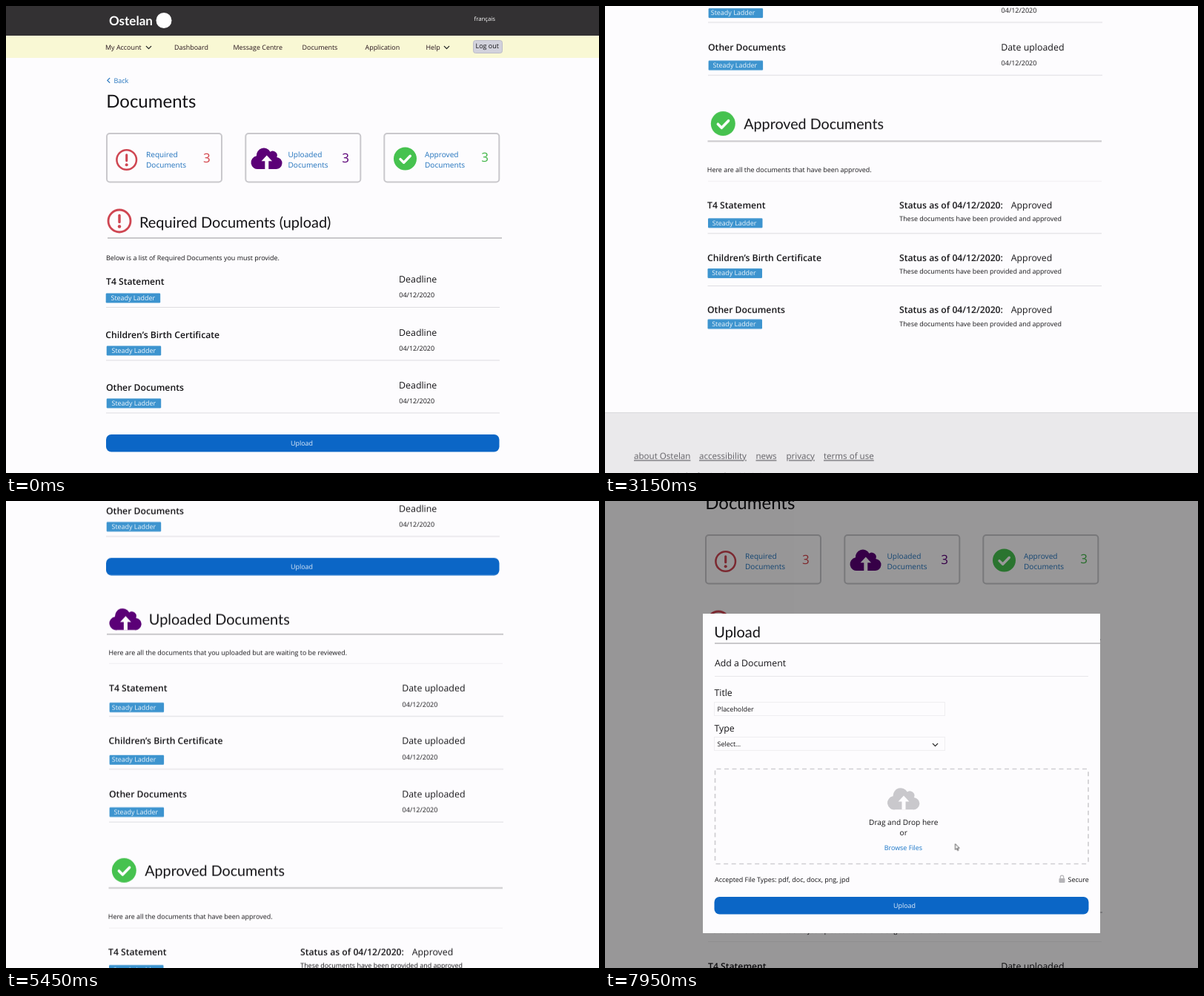
These frames come from a looping animation (800 by 630 pixels, 8 s). An HTML page:

```html
<!DOCTYPE html>
<html lang="en">
<head>
<meta charset="utf-8">
<title>Documents</title>
<style>
  html, body { margin: 0; width: 100%; height: 100%; overflow: hidden; background: #fdfcfe; }
  svg { display: block; width: 800px; height: 630px; }
  text { font-family: "Open Sans", "Noto Sans", sans-serif; fill: #141316; text-rendering: geometricPrecision; white-space: pre; }
  .head { font-family: Lato, sans-serif; }
  .link { text-decoration: underline; }
</style>
</head>
<body>
<svg id="stage" viewBox="0 0 800 630">
  <rect width="800" height="630" fill="#fdfcfe"/>
  <g id="page"></g>
  <path id="shade" d="M0 0H800V630H0ZM132 152V583H668V152Z" fill="#000" opacity="0"/>
  <g id="modal" opacity="0"></g>
  <path id="cursor" d="M0 0v8l1.9-1.8 1.3 2.9 1.2-.5-1.3-2.8h2.6z" fill="#fff" stroke="#333" stroke-width=".8" opacity="0"/>
</svg>
<script>
const LOOP = 8000;
const SMALL = 8.95, LABEL = 10.1, BODY = 12.3, HEAD = 19.95;
const BLUE = '#0b66c6', LINK = '#2273bd', RED = '#cf4652', PURPLE = '#5b0077', GREEN = '#46c24f';
const RULE = '#c9c8cb', THIN = '#dddce0', FAINT = '#efeef1';
const PLACE = 'Ostelan', PROGRAM = 'Steady Ladder';

const $ = id => document.getElementById(id);
let layer = $('page');

function add(tag, attrs, content) {
  const el = document.createElementNS('http://www.w3.org/2000/svg', tag);
  for (const k in attrs) el.setAttribute(k, attrs[k]);
  if (content) el.textContent = content;
  return layer.appendChild(el);
}
const text = (x, y, str, size = SMALL, more = {}) => add('text', { x, y, 'font-size': size, ...more }, str);
const bold = (x, y, str) => text(x, y, str, 12.2, { 'font-weight': 600 });
const head = (x, y, str, size = HEAD) => text(x, y, str, size, { class: 'head' });
const mid = (x, y, str, size = SMALL, fill = '#141316') =>
  text(x, y, str, size, { 'text-anchor': 'middle', style: `fill:${fill}` });
const tint = (x, y, str, fill, size = SMALL, weight = 400) =>
  text(x, y, str, size, { style: `fill:${fill}`, 'font-weight': weight });
const rect = (x, y, width, height, fill, more = {}) => add('rect', { x, y, width, height, fill, ...more });
const circle = (cx, cy, r, fill, more = {}) => add('circle', { cx, cy, r, fill, ...more });
const rule = (x, y, end, color = THIN, h = 1) => rect(x, y - h / 2, end - x, h, color);
const stroke = (d, color, w) =>
  add('path', { d, fill: 'none', stroke: color, 'stroke-width': w, 'stroke-linecap': 'round', 'stroke-linejoin': 'round' });
const chevron = (x, y, color = '#222') => stroke(`M${x - 3.2} ${y - 1.6}l3.2 3.2 3.2-3.2`, color, 1.3);

function cloud(x, y, s, color) {
  const transform = `translate(${x} ${y}) scale(${s})`;
  add('path', { transform, fill: color,
    d: 'M9 28.5A9 9 0 0 1 6 10.7A10 10 0 0 1 24.7 5A6 6 0 0 1 33.6 12.4A8 8 0 0 1 32 28.5Z' });
  add('path', { transform, fill: '#fdfcfe', d: 'M20 10l7.3 7.8h-4.8v10.7h-5v-10.7h-4.8z' });
}
function alertIcon(x, y, r) {
  circle(x, y, r, 'none', { stroke: RED, 'stroke-width': r * .19 });
  stroke(`M${x} ${y - r * .5}V${y + r * .1}`, RED, r * .23);
  circle(x, y + r * .5, r * .15, RED);
}
function tick(x, y, r) {
  circle(x, y, r, GREEN);
  stroke(`M${x - r * .42} ${y + r * .04}l${r * .3} ${r * .3} ${r * .56} ${-r * .58}`, '#fff', r * .22);
}
function badge(x, y, textX) {
  rect(x, y, 73.5, 13, '#3d94cf', { rx: 1.2 });
  tint(textX, y + 9.4, PROGRAM, '#f0f7fc');
}
function button(x, y, w, labelX) {
  rect(x, y, w, 23.5, BLUE, { rx: 7 });
  mid(labelX, y + 14.6, 'Upload', SMALL, '#e4eefa');
}
function card(x, textX, name, numX, numY, color) {
  rect(x, 172, 155, 65.5, 'none', { rx: 4, stroke: '#c9c8cc', 'stroke-width': 2 });
  tint(textX, 204.3, name, LINK, LABEL);
  tint(textX, 218, 'Documents', LINK, LABEL);
  tint(numX, numY, '3', color, 17, 500);
}
const TITLES = ['T4 Statement', 'Children’s Birth Certificate', 'Other Documents'];

function buildPage() {
  rect(0, 0, 800, 40, '#333133');
  text(139, 26.3, PLACE, 17, { class: 'head', 'font-weight': 700, style: 'fill:#fff' });
  circle(213, 19.5, 10.5, '#fff');
  tint(631.5, 20.2, 'français', '#fff', 7.8);
  rect(0, 40, 800, 30, '#f9f8d4');
  [[134, 'My Account'], [227, 'Dashboard'], [306.5, 'Message Centre'], [399.5, 'Documents'], [484.5, 'Application'], [566.5, 'Help']]
    .forEach(([x, s]) => tint(x, 58.6, s, '#26131b'));
  chevron(192.5, 56);
  chevron(594.5, 56);
  rect(630.5, 46.5, 39, 17, '#d2d2dc', { rx: 3, stroke: '#bcbcc8' });
  text(633.5, 57.4, 'Log out');

  stroke('M139.8 97.3l-3 3 3 3', LINK, 1.2);
  tint(145.5, 103.6, 'Back', LINK, 9);
  head(135.2, 137.3, 'Documents', 24);

  card(136, 189, 'Required', 266, 211, '#d3434a');
  card(323.3, 380.5, 'Uploaded', 453.3, 211, PURPLE);
  card(510.3, 565, 'Approved', 641.3, 210, '#43b649');
  alertIcon(162.7, 207.5, 13.3);
  cloud(332, 191.7, .99, PURPLE);
  tick(538.5, 206, 15.5);

  alertIcon(153, 290, 15);
  head(180, 298.8, 'Required Documents (upload)');
  rule(137, 313, 669, RULE, 2);
  text(135, 343, 'Below is a list of Required Documents you must provide.');
  [[375.5, 387.5, 406.5], [447.5, 458.5, 478], [518.7, 529.5, 549]].forEach(([y, by, line], i) => {
    bold(i === 1 ? 134.2 : 135, y, TITLES[i]);
    badge(i ? 135.7 : 134.7, by, i ? 142.5 : 141.5);
    text(530, y - 2.8, 'Deadline', 12.4);
    text(530.3, y + 17.5, '04/12/2020', 9);
    rule(135, line, 666);
  });
  button(135, 578, 530.5, 399);

  cloud(141, 646.3, 1.02, PURPLE);
  head(192.8, 668, 'Uploaded Documents');
  rule(136, 681, 671, RULE, 2);
  text(138.4, 709.3, 'Here are all the documents that you uploaded but are waiting to be reviewed.');
  rule(139, 720.5, 670, FAINT);
  [[758.2, 773.3, 791.7], [829.3, 844, 863], [900.5, 914.5, 934.3]].forEach(([y, by, line], i) => {
    bold(i === 1 ? 138.6 : 139, y, TITLES[i]);
    badge(139.6, by, i === 2 ? 145.5 : 142.8);
    text(534.2, y, 'Date uploaded', 12.4);
    text(534.6, y + 20.4, '04/12/2020', 9);
    rule(139, line, 671);
  });

  tick(159.3, 999.6, 16.5);
  head(187.3, 1007, 'Approved Documents', 19.7);
  rule(138.5, 1023.3, 670, RULE, 2);
  text(137.8, 1065, 'Here are all the documents that have been approved.');
  rule(139, 1077.3, 670, FAINT);
  [[1114, 1127.2, 1147.7], [1184.7, 1195, 1218.5], [1255.3, 1263.5]].forEach(([y, by, line], i) => {
    bold(138, y, TITLES[i]);
    badge(i ? 138.5 : 139, by, i ? 144.2 : 144.8);
    bold(397, y, 'Status as of 04/12/2020:');
    text(547.8, y, 'Approved', BODY);
    text(397.2, y + 17.3, 'These documents have been provided and approved');
    if (line) rule(138.5, line, 670);
  });

  rect(0, 1389, 800, 260, '#eae9eb');
  rule(0, 1389.5, 800, '#d9d8db');
  const link = (x, y, s, size) => text(x, y, s, size, { class: 'link', style: 'fill:#626166' });
  [[39, 'about ' + PLACE], [127, 'accessibility'], [203.5, 'news'], [244.5, 'privacy'], [295, 'terms of use']]
    .forEach(([x, s]) => link(x, 1452.4, s, 11.6));
  link(39, 1477.7, `© Regent’s Binder for ${PLACE}, 2012–21`, 9.85);
}

function buildModal() {
  layer = $('modal');
  rect(132, 152, 536, 431, '#fdfcfe');
  head(147.3, 184.3, 'Upload');
  rule(148, 192, 668, RULE, 2);
  text(148, 223.4, 'Add a Document', BODY);
  rule(148, 236.5, 652, '#e8e7ea');
  text(147.5, 263, 'Title', BODY);
  text(147.5, 310.6, 'Type', BODY);
  [271.5, 318.5].forEach(y => rect(147.5, y, 311, 18, 'none', { stroke: '#efeef1' }));
  text(151.5, 283.7, 'Placeholder');
  text(151.5, 331.2, 'Select...');
  chevron(445.5, 329);
  rect(148.5, 361.5, 503.5, 128, 'none', { rx: 2, stroke: '#cfced2', 'stroke-width': 1.7, 'stroke-dasharray': '6 4.5' });
  cloud(382.6, 387.3, 1.02, '#c9c8cc');
  mid(402.7, 437, 'Drag and Drop here', LABEL);
  mid(402.7, 450.8, 'or', LABEL);
  mid(402.4, 470.7, 'Browse Files', SMALL, '#1a76c8');
  text(148, 514.2, 'Accepted File Types: pdf, doc, docx, png, jpd');
  rect(612.5, 509, 8, 6, '#b5b4b8', { rx: 1 });
  stroke('M614.3 509v-1.6a2.2 2.2 0 0 1 4.4 0v1.6', '#b5b4b8', 1.2);
  text(624.5, 514.2, 'Secure');
  button(147.5, 534, 505, 404);
}

// Steps are [ms, value, easing towards the next step].
function play(el, prop, steps) {
  const all = [[0, steps[0][1]], ...steps, [LOOP, steps[steps.length - 1][1]]];
  el.animate(all.map(([t, v, easing = 'linear']) => ({ offset: t / LOOP, [prop]: v, easing })),
    { duration: LOOP, iterations: Infinity });
}

buildPage();
buildModal();

const wheel = 'cubic-bezier(.35,.1,.35,1)';
play($('page'), 'transform', [
  [420, 0, wheel], [1000, 188],
  [1370, 188, wheel], [2050, 438.4],
  [2620, 438.4, wheel], [3380, 877],
  [4370, 877, wheel], [5150, 501.3],
  [5480, 501.3, wheel], [6200, 126]
].map(([t, y, e]) => [t, `translate(0px, ${-y}px)`, e]));

play($('cursor'), 'transform', [
  [6850, 'translate(760px, 545px)', 'cubic-bezier(.4,0,.3,1)'],
  [7500, 'translate(472.5px, 462.5px)']
]);
play($('cursor'), 'opacity', [[6840, 0, 'step-end'], [6850, 1]]);
play($('modal'), 'opacity', [[7650, 0], [7700, .33], [7750, .58], [7850, .88], [7940, 1]]);
play($('shade'), 'opacity', [[7650, 0], [7700, .07], [7800, .26], [7930, .4]]);
</script>
</body>
</html>
```
